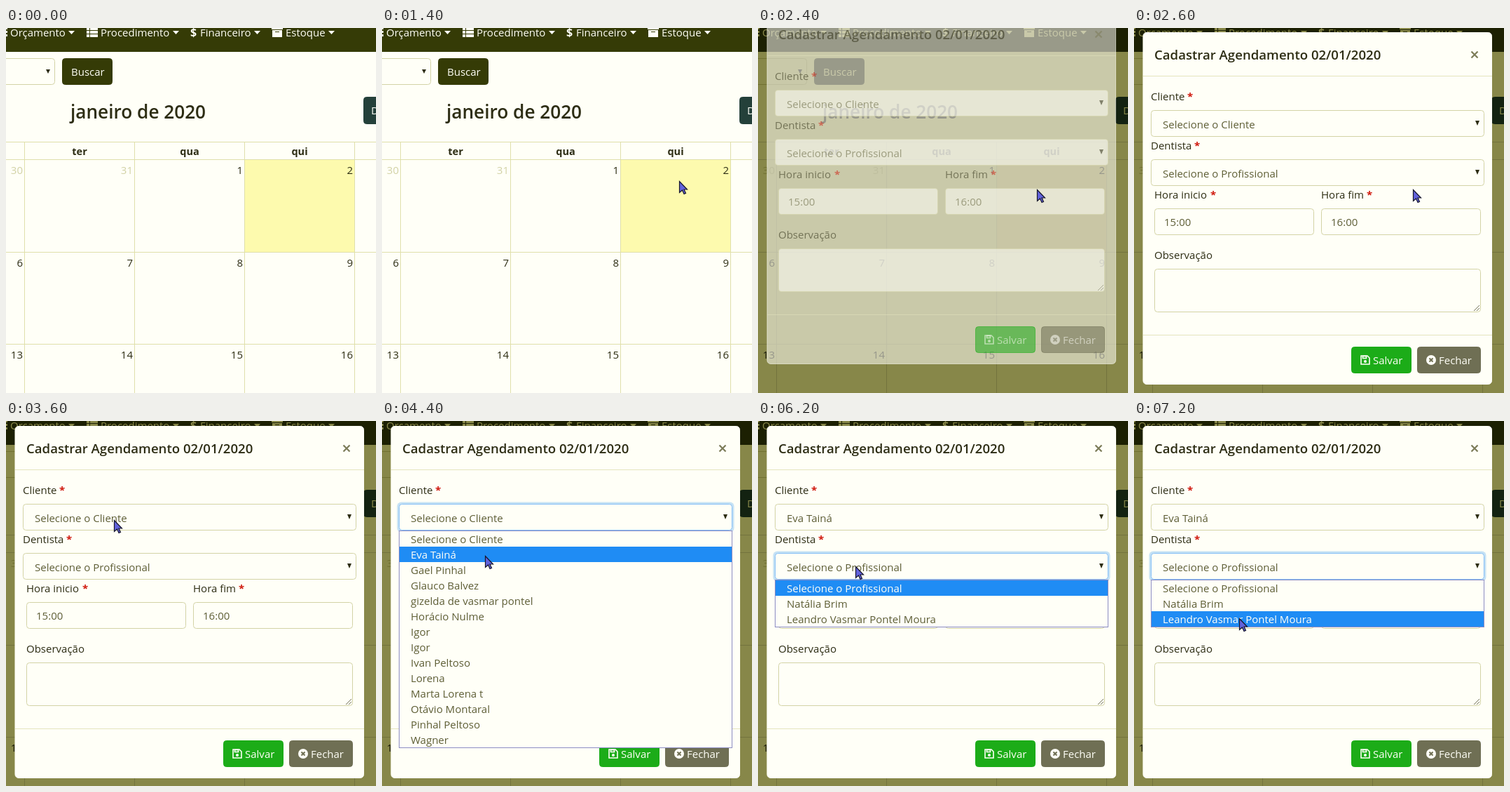
Write an HTML page with a canvas that moves like this. It is 528 px wide and 520 px high and loops after 8 s.

```html
<!DOCTYPE html>
<html lang="pt-BR">
<head>
<meta charset="utf-8">
<title>Agenda</title>
<style>
html, body { margin: 0; width: 528px; height: 520px; overflow: hidden; background: #fffff7; }
canvas { display: block; }
</style>
</head>
<body>
<canvas id="stage" width="528" height="520"></canvas>
<script>
const g = document.getElementById('stage').getContext('2d');
const LOOP = 8000;
const FONT = '"Open Sans", "Noto Sans", sans-serif';
const WHITE = '#fffff7', INK = '#2d2d14', GRAY = '#5e5e36', NAV = '#353b06',
      BORDER = '#d3d3a6', RULE = '#e4e4be', BLUE = '#1f8cf4';

const clients = ['Selecione o Cliente', 'Eva Tainá', 'Gael Pinhal', 'Glauco Balvez',
  'gizelda de vasmar pontel', 'Horácio Nulme', 'Igor', 'Igor', 'Ivan Peltoso', 'Lorena',
  'Marta Lorena t', 'Otávio Montaral', 'Pinhal Peltoso', 'Wagner'];
const dentists = ['Selecione o Profissional', 'Natália Brim', 'Leandro Vasmar Pontel Moura'];

// pointer stops: time, x, y
const stops = [
  [200, 146, 52], [400, 482, 173], [1000, 514, 180], [1200, 470, 196], [1400, 424, 218],
  [1600, 398, 230], [3000, 330, 205], [3200, 240, 170], [3400, 168, 146], [3600, 154, 141],
  [4000, 152, 160], [4200, 149, 180], [4400, 147, 192], [5200, 145, 196], [5600, 142, 202],
  [5800, 140, 206], [6000, 139, 207], [6800, 144, 252], [7000, 148, 272], [7200, 150, 281]
];

function rect(x, y, w, h, color) {
  g.fillStyle = color;
  g.fillRect(x, y, w, h);
}

function box(x, y, w, h, r, fill, stroke) {
  g.beginPath();
  g.roundRect(x + .5, y + .5, w - 1, h - 1, r);
  g.fillStyle = fill;
  g.fill();
  g.strokeStyle = stroke || fill;
  g.lineWidth = 1;
  g.stroke();
}

function text(s, x, y, color = INK, size = 15, weight = 400, align = 'left') {
  g.font = `${weight} ${size}px ${FONT}`;
  g.textAlign = align;
  g.fillStyle = color;
  g.fillText(s, x, y);
}

function poly(points, fill) {
  g.beginPath();
  for (const [x, y] of points) g.lineTo(x, y);
  g.closePath();
  g.fillStyle = fill;
  g.fill();
}

function caret(x, y, w, h, color) {
  poly([[x, y], [x + w, y], [x + w / 2, y + h]], color);
}

function cross(x, y, r, width, color) {
  g.beginPath();
  g.moveTo(x - r, y - r); g.lineTo(x + r, y + r);
  g.moveTo(x + r, y - r); g.lineTo(x - r, y + r);
  g.strokeStyle = color;
  g.lineWidth = width;
  g.stroke();
}

function navBar() {
  rect(0, 0, 528, 34, NAV);
  const items = [['Orçamento', 6, 89], ['Procedimento', 135, 238],
                 ['Financeiro', 277, 354], ['Estoque', 399, 460]];
  for (const [label, x, cx] of items) {
    text(label, x, 12, WHITE);
    caret(cx, 4, 9, 5, WHITE);
  }
  for (const y of [-1, 4, 9]) {
    rect(0, y, 2, 3, WHITE);
    rect(115, y, 4, 4, WHITE);
    rect(120, y, 11, 4, WHITE);
  }
  text('$', 263, 12, WHITE, 16, 700);
  rect(379, -1, 16, 3, WHITE);
  rect(380, 3, 14, 10, WHITE);
  rect(384, 5, 6, 1, NAV);
}

function page(t) {
  rect(0, 0, 528, 520, WHITE);
  navBar();
  box(-20, 43, 90, 38, 4, WHITE, BORDER);
  caret(57, 59, 6, 6, INK);
  box(80, 43, 72, 38, 4, NAV);
  text('Buscar', 93, 68, WHITE);
  text('janeiro de 2020', 92, 129, INK, 26.2, 600);
  box(510, 98, 40, 39, 4, '#24403a');
  text('D', 521, 123, WHITE);

  rect(341, 188, 156, 131, t < 2200 ? '#fdfaae' : '#fff5dc');
  const line = t < 2200 ? '#dfdfab' : '#dadad2';
  for (const y of [162, 187, 319, 450]) rect(0, y, 528, 1, line);
  for (let i = 0; i < 4; i++) rect(26 + 157 * i, 162, 1, 358, line);
  ['ter', 'qua', 'qui'].forEach((d, i) => text(d, 105 + 157 * i, 181, INK, 14.5, 700, 'center'));
  const days = [[30, 31, 1, 2], [6, 7, 8, 9], [13, 14, 15, 16]];
  days.forEach((week, r) => week.forEach((d, c) =>
    text(d, 24 + 157 * c, 208 + Math.round(131.5 * r), d > 29 ? '#d2d2a6' : INK, 15, 400, 'right')));
}

function shade(color) {
  g.globalCompositeOperation = 'multiply';
  rect(0, 0, 528, 520, color);
  g.globalCompositeOperation = 'source-over';
}

function label(s, x, y, starX) {
  text(s, x, y);
  if (starX) text('*', starX, y, '#d0180c', 15, 700);
}

function select(y, value, focus) {
  if (focus) {
    g.beginPath();
    g.roundRect(21.5, y - 2.5, 481, 43, 6);
    g.fillStyle = '#c6e2f4';
    g.fill();
  }
  box(24, y, 476, 38, 4, WHITE, focus ? '#82bdf6' : BORDER);
  text(value, 41, y + 26, GRAY);
  caret(487, y + 15, 6, 7, INK);
}

function field(x, value) {
  box(x, 258, 228, 38, 4, WHITE, BORDER);
  text(value, x + 14, 283, GRAY);
}

function options(y, list, hot) {
  const h = list.length * 22 + 2;
  rect(24, y, 476, h, '#8c8cc4');
  rect(25, y + 1, 474, h - 2, WHITE);
  list.forEach((s, i) => {
    const top = y + 1 + 22 * i;
    if (i === hot) rect(25, top, 474, 22, BLUE);
    text(s, 41, top + 17, i === hot ? WHITE : GRAY);
  });
}

function footer() {
  rect(13, 438, 498, 1, RULE);
  box(310, 455, 86, 38, 4, '#1cac18');
  text('Salvar', 341, 480, WHITE);
  g.beginPath();
  for (const [x, y] of [[324, 468], [333, 468], [336, 471], [336, 480], [324, 480]]) g.lineTo(x, y);
  g.closePath();
  g.strokeStyle = WHITE;
  g.lineWidth = 1.6;
  g.stroke();
  g.strokeRect(326.5, 468.5, 5, 3);
  g.beginPath();
  g.arc(330, 476, 2, 0, 7);
  g.fillStyle = WHITE;
  g.fill();

  box(404, 455, 91, 38, 4, '#6f6f54');
  text('Fechar', 435, 480, WHITE);
  g.beginPath();
  g.arc(424, 474, 7, 0, 7);
  g.fillStyle = WHITE;
  g.fill();
  cross(424, 474, 2.5, 2, '#6f6f54');
}

function modal(t) {
  box(12.5, 7, 498.5, 502, 5, WHITE);
  text('Cadastrar Agendamento 02/01/2020', 29, 46, INK, 18.6, 600);
  cross(486, 39, 4.5, 2.2, '#7c7c58');
  rect(13, 69, 498, 1, RULE);
  label('Cliente', 24, 104, 76);
  select(118, clients[t < 5000 ? 0 : 1], t >= 3800 && t < 6000);
  label('Dentista', 24, 174, 86);
  select(188, dentists[0], t >= 6000);
  label('Hora inicio', 29, 244, 109);
  label('Hora fim', 267, 244, 332);
  field(29, '15:00');
  field(267, '16:00');
  label('Observação', 29, 330);
  box(29, 344, 466, 62, 4, WHITE, BORDER);
  g.beginPath();
  g.moveTo(485, 404); g.lineTo(493, 396);
  g.moveTo(489, 404); g.lineTo(493, 400);
  g.strokeStyle = '#77775a';
  g.stroke();
  footer();
}

function pointer(x, y) {
  g.save();
  g.translate(x + .5, y + .5);
  poly([[0, 0], [0, 16], [4, 12.5], [6.5, 18], [9, 17], [6.5, 11.5], [11, 11.5]], '#6262dc');
  g.strokeStyle = '#16162a';
  g.lineWidth = 1.2;
  g.stroke();
  g.restore();
}

function draw(t) {
  const at = stops.filter(s => s[0] <= t).pop();
  page(t);
  if (t >= 2200) shade(t < 2400 ? '#f6f6c0' : '#87874b');
  if (t >= 2400) {
    g.save();
    g.globalAlpha = t < 2600 ? .55 : 1;
    g.translate(0, t < 2600 ? -30 : t < 2800 ? -1 : 0);
    modal(t);
    g.restore();
  }
  const hot = top => Math.max(0, Math.floor((at[2] - top - 1) / 22));
  if (t >= 3800 && t < 5000) options(156, clients, hot(156));
  if (t >= 6000) options(226, dentists, hot(226));
  if (at) pointer(at[1], at[2]);
}

const start = performance.now();
function frame() {
  draw((performance.now() - start) % LOOP);
  requestAnimationFrame(frame);
}
frame();
</script>
</body>
</html>
```
